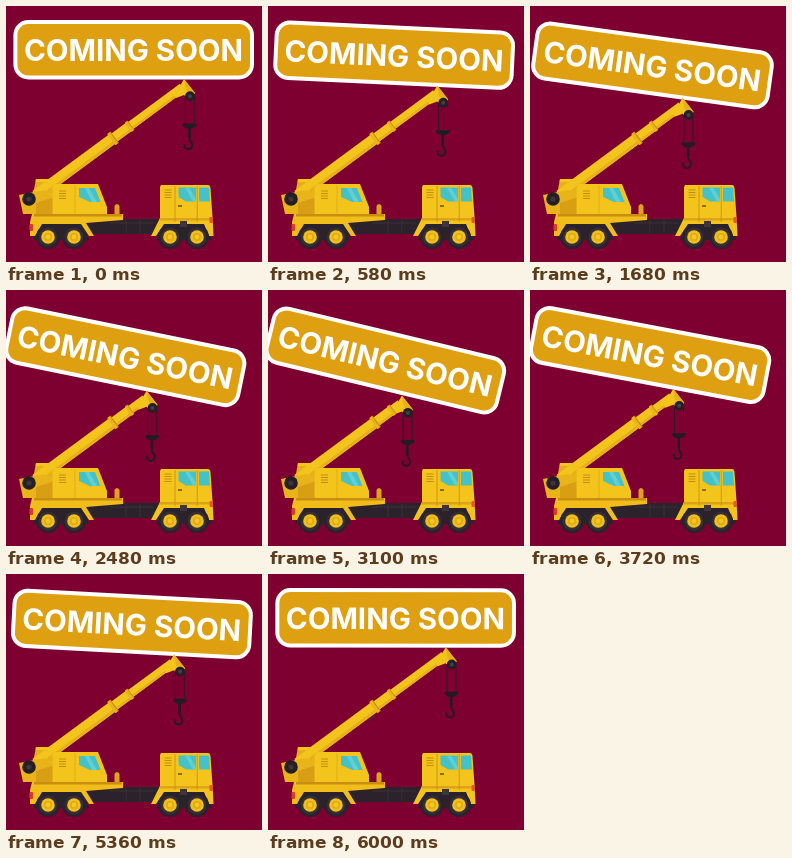
Write an HTML page that moves like this. It is 256 px wide and 256 px high and loops after 6020 ms.

```html
<!DOCTYPE html>
<html lang="en">
<head>
<meta charset="utf-8">
<title>Coming soon</title>
<style>
  html, body { margin: 0; width: 100%; height: 100%; overflow: hidden; background: #7e0030; }
  svg { display: block; width: 100vw; height: 100vh; }
  text { font: 700 29.5px Inter, Arial, sans-serif; fill: #fff; text-anchor: middle; }
</style>
</head>
<body>
<svg viewBox="0 0 256 256">
  <defs>
    <g id="wheel">
      <circle r="12" fill="#2b232b"/>
      <circle r="9.4" fill="#362d35"/>
      <circle r="6.8" fill="#f0c01c"/>
      <circle r="4" fill="#e0a917"/>
      <circle r="2.4" fill="#f3c822"/>
    </g>
    <path id="vents" d="M0 0h7M0 2.5h7M0 5h7M0 7.5h7" stroke="#c48d12"/>
  </defs>

  <g id="sign">
    <rect x="9.4" y="16" width="236.6" height="55.4" rx="13" fill="#dea010" stroke="#fff" stroke-width="4"/>
    <text x="127.5" y="55">COMING SOON</text>
  </g>

  <!-- sliding boom section with pulley and hook -->
  <g id="slide">
    <g transform="translate(23.5 194) rotate(-36.4)">
      <path d="M100-4.3H190V4.3H100z" fill="#f3c41c"/>
      <path d="M100 2H188V4.3H100z" fill="#e6b018"/>
    </g>
    <path d="M178 73L189 87 184 94 178 89 170 92 166 85 174 80z" fill="#f3c41c"/>
    <path d="M178 73L189 87 186 90 180 84z" fill="#e6b018"/>
    <path d="M179.3 91V118M188.3 91V118" stroke="#2b1a26" stroke-width=".9"/>
    <circle cx="184" cy="90.2" r="4.9" fill="#241e25"/>
    <circle cx="184" cy="90.2" r="2" fill="#473f47"/>
    <path d="M177 117.5H190.500V120L186 122.500H181L177 120z" fill="#241a23"/>
    <path d="M183.500 122V131" stroke="#241a23" stroke-width="2.600"/>
    <path d="M183.500 130v3c0 2 2.700 3 2.700 6a3.900 4.200 0 0 1-7.800 0v-1" fill="none" stroke="#241a23" stroke-width="2"/>
  </g>

  <!-- fixed boom -->
  <path d="M30 173H48.500L47 189H27z" fill="#e6ae18"/>
  <path d="M30 173H48.500V176H29.500z" fill="#f3c41c"/>
  <path d="M35 179H43L36 187H32z" fill="#7e0030"/>
  <g transform="translate(23.5 194) rotate(-36.4)">
    <path d="M100-5H124V5H100z" fill="#f3c41c"/>
    <path d="M100 2.500H124V5H100z" fill="#e6b018"/>
    <path d="M8-5.600H104V5.600H3z" fill="#f3c41c"/>
    <path d="M8 2.500H104V5.600H3z" fill="#e6b018"/>
    <rect x="101.500" y="-7" width="4" height="14" rx="1" fill="#e9b41a"/>
    <rect x="104.800" y="-7" width="1" height="14" fill="#c98d10"/>
    <rect x="122.500" y="-5.800" width="3.500" height="11.600" rx="1" fill="#e9b41a"/>
    <rect x="125.300" y="-5.800" width=".8" height="11.600" fill="#c98d10"/>
    <path d="M89 7.500H99" stroke="#4a2a20"/>
  </g>

  <!-- turntable and operator cabin -->
  <path d="M13 189L38 184 48 188V208H17z" fill="#e9b41a"/>
  <path d="M30 197L48 191V208H30z" fill="#d99f14"/>
  <circle cx="23" cy="193" r="6.800" fill="#241e25"/>
  <circle cx="23" cy="193" r="2.600" fill="#3d343c"/>
  <path d="M49 178H92L101 201V209H46.500V181z" fill="#f3c41c"/>
  <path d="M69 179V208" stroke="#dca615" stroke-width=".7"/>
  <path d="M73 182H89L94.500 196H84L73 191z" fill="#45c1c8"/>
  <path d="M79 182H83L91 196H86z" fill="#62cfd3"/>
  <use href="#vents" x="53" y="185"/>

  <!-- chassis -->
  <path d="M80 213H156V228H80z" fill="#2b222b"/>
  <path d="M104 217H148M120 214V227M134 214V227" stroke="#3b3139"/>
  <path d="M108.500 200Q111 196 113.500 200V210H108.500z" fill="#dfa21a"/>
  <path d="M33 217H77L83 234H27z" fill="#2b222b"/>
  <path d="M26 208H117V214L80 217 88 230H83L75 218H36L29 230H24V216z" fill="#f0bd1b"/>
  <path d="M28 208H116V210.500H28z" fill="#c98d12"/>
  <rect x="23.500" y="218" width="3.500" height="7" rx="1" fill="#d93a2b"/>

  <!-- driver cab -->
  <path d="M156 217H202L206 234H150z" fill="#2b222b"/>
  <path d="M155 179H202Q204 179 204.500 182L206.500 211 207.500 230H203L198 218H158L150 230H145L154 212V181z" fill="#f3c41c"/>
  <path d="M154 212H206.500V214.500H153z" fill="#dca416"/>
  <path d="M169 180V216M191.200 180V216" stroke="#c68f11" stroke-width=".8"/>
  <path d="M172.500 181.500H190V195.500H180L172.500 191z" fill="#45c1c8"/>
  <path d="M179 181.500H183L190 193V195.500H187z" fill="#62cfd3"/>
  <path d="M192.800 181.500H203L204 195.500H192.800z" fill="#45c1c8"/>
  <path d="M172 200H176" stroke="#5a3b14" stroke-width="1.300"/>
  <use href="#vents" x="158.500" y="184"/>
  <rect x="174" y="215" width="7" height="6" fill="#40353a"/>
  <rect x="203.500" y="211" width="3.500" height="6" rx="1" fill="#e25a2a"/>

  <use href="#wheel" x="42" y="231"/>
  <use href="#wheel" x="68" y="231"/>
  <use href="#wheel" x="164" y="231"/>
  <use href="#wheel" x="191" y="231"/>
</svg>
<script>
  const LOOP = 6020;
  const sign = document.getElementById("sign");
  const slide = document.getElementById("slide");

  function draw() {
    // 0 to 1 and back at constant speed
    const p = 1 - Math.abs(1 - 2 * (performance.now() % LOOP) / LOOP);
    sign.setAttribute("transform", `rotate(${14 * p} 10 13.5)`);
    slide.setAttribute("transform", `translate(${-45.5 * p} ${33.6 * p})`);
    requestAnimationFrame(draw);
  }
  draw();
</script>
</body>
</html>
```
